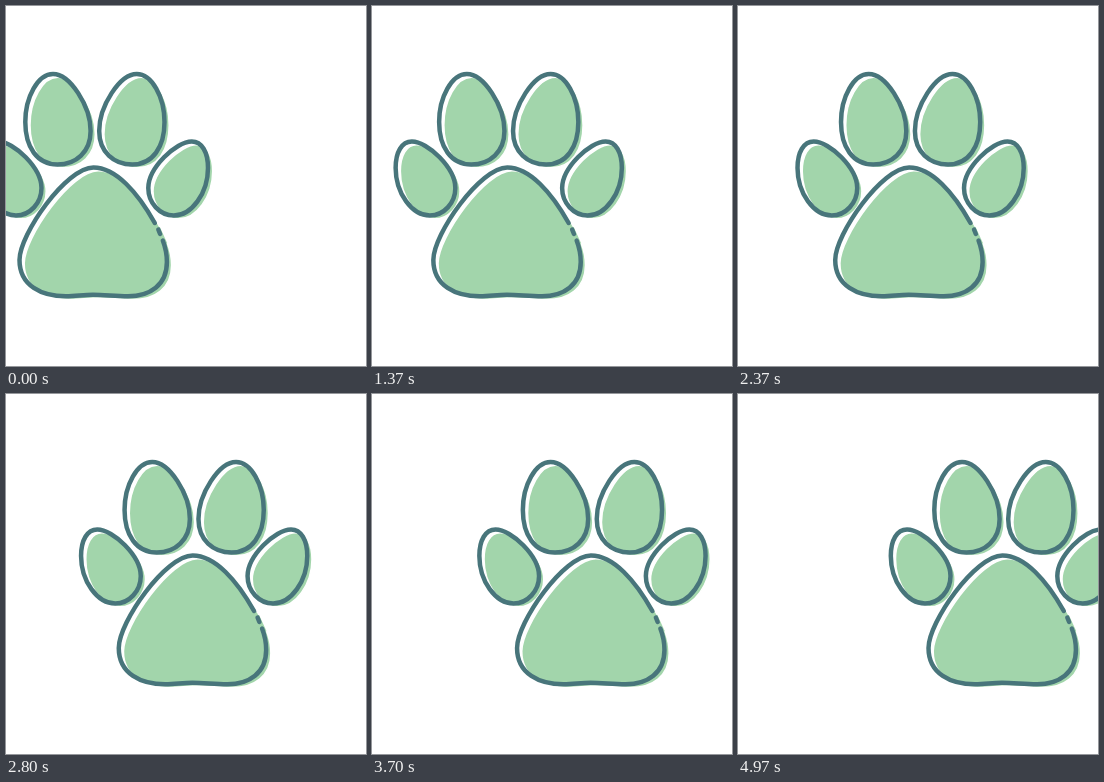
An HTML page with a canvas that plays this animation: 360 by 360 pixels, repeating every 5010 ms.

```html
<!DOCTYPE html>
<html lang="en">
<head>
<meta charset="utf-8">
<title>Paw</title>
<style>
  html, body { margin: 0; width: 100%; height: 100%; overflow: hidden; background: #fff; }
  canvas { display: block; width: 360px; height: 360px; }
</style>
</head>
<body>
<canvas id="stage"></canvas>
<script>
const SIZE = 360, LOOP = 5010, STEP = 100 / 3, SPEED = 1.196;
const GREEN = '#a2d5ab', LINE = '#48757b', PAPER = '#fff';
const WEIGHT = 4.5, TRIM = 1.5;
const SHIFT_X = 4.7, SHIFT_Y = 3.3;   // fill is printed off register
const MIRROR = 177.8;

const canvas = document.getElementById('stage');
const ctx = canvas.getContext('2d');
const dpr = window.devicePixelRatio || 1;
canvas.width = canvas.height = SIZE * dpr;

const innerToe = new Path2D(`M47 68 C64 68 84.6 100 84.6 125
  C84.6 146 70 158.5 51.5 158.5 C31 158.5 19.3 141 19.3 116
  C19.3 91 32 68 47 68 Z`);
const outerToe = new Path2D(`M-8 135.5 C8 135.5 35.5 162 35.5 182
  C35.5 197 24 209.5 10 209.5 C-8 209.5 -24.2 187 -24.2 162
  C-24.2 146 -18 135.5 -8 135.5 Z`);
const pad = new Path2D(`M156.8 234.5 C159.3 241 160.9 249 160.9 256
  C160.9 279 144 290.3 122 290.3 C109 290.3 99 288.7 87 288.7
  C77 288.7 70 290.3 60 290.3 C36 290.3 13.5 280 13.5 254
  C13.5 228 60.5 161.5 87.4 161.5 C110 161.5 132 187 148.8 217`);
const dash = new Path2D('M152.3 223.5 L154.1 228');

function mirrored(path) {
  const copy = new Path2D();
  copy.addPath(path, new DOMMatrix([-1, 0, 0, 1, MIRROR, 0]));
  return copy;
}

const shapes = [innerToe, mirrored(innerToe), outerToe, mirrored(outerToe), pad];

function stroke(path, color, width) {
  ctx.strokeStyle = color;
  ctx.lineWidth = width;
  ctx.stroke(path);
}

function offsetAt(t) {
  const tick = Math.floor((Math.floor(t / 10) * 10 + 4) / STEP);
  return Math.max(0, tick - 1) * SPEED;
}

function draw(t) {
  ctx.setTransform(dpr, 0, 0, dpr, 0, 0);
  ctx.fillStyle = PAPER;
  ctx.fillRect(0, 0, SIZE, SIZE);
  ctx.translate(offsetAt(t), 0);
  ctx.lineCap = ctx.lineJoin = 'round';

  // fills, slightly smaller than their outlines
  ctx.save();
  ctx.translate(SHIFT_X, SHIFT_Y);
  ctx.fillStyle = GREEN;
  for (const shape of shapes) {
    ctx.fill(shape);
    stroke(shape, PAPER, TRIM);
  }
  ctx.restore();

  for (const shape of [...shapes, dash]) stroke(shape, LINE, WEIGHT);
}

const start = performance.now();
function loop() {
  draw((performance.now() - start) % LOOP);
  requestAnimationFrame(loop);
}
loop();
</script>
</body>
</html>
```
